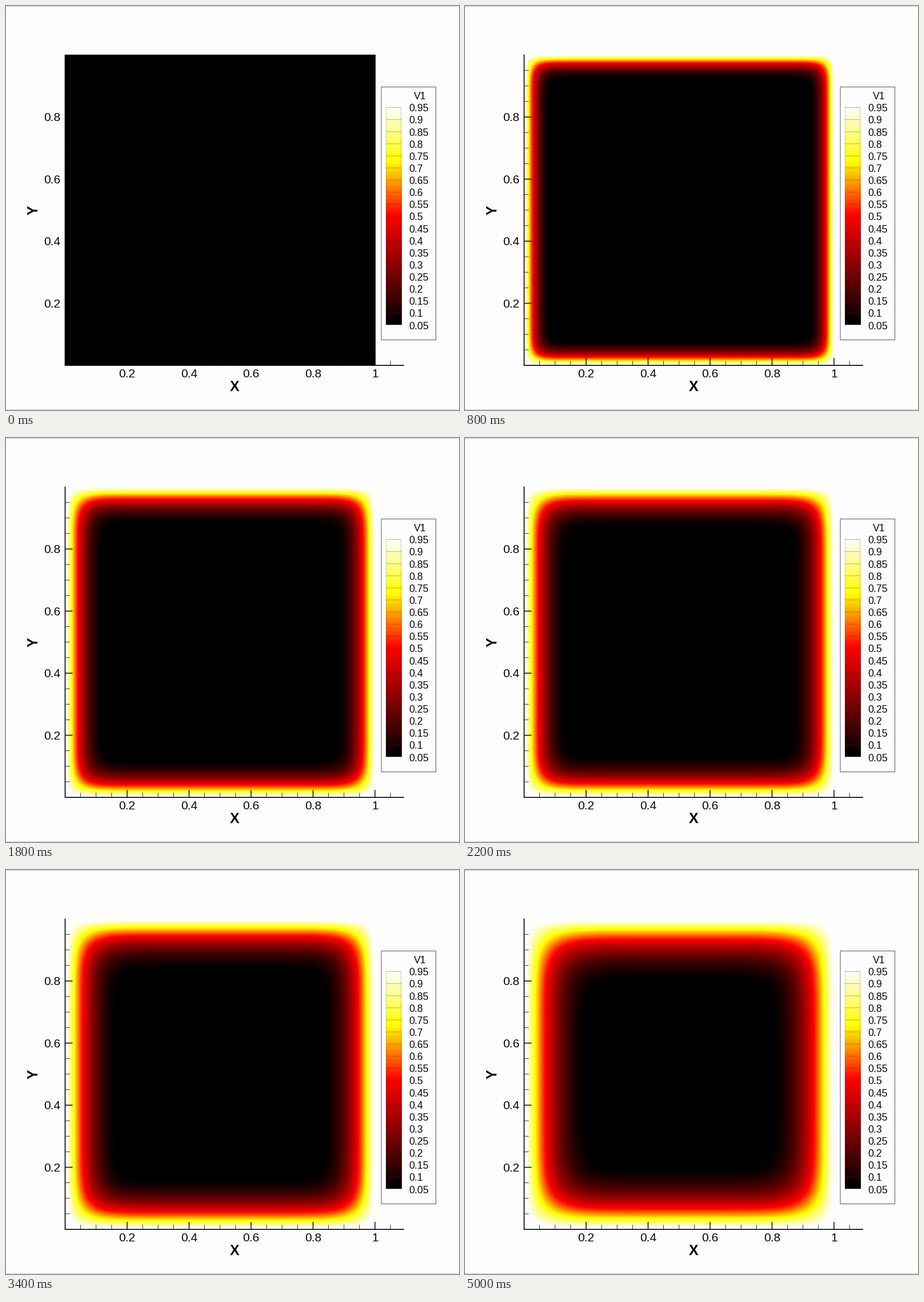
These frames come from a looping animation (793x706 px, 5.2 s). A matplotlib script:

```python
import math

import numpy as np
import matplotlib.pyplot as plt
from matplotlib.animation import FuncAnimation
from matplotlib.colors import LinearSegmentedColormap
from matplotlib.patches import Rectangle

W, H, DPI = 793, 706, 100
FRAMES, INTERVAL = 26, 200
PT = 72 / DPI                      # points per pixel
LEFT, TOP, SIZE = 104, 86, 542     # heat map square
X0, Y0, UNIT = 103.5, 628, 542.5   # axis origin and length of one unit
SPREAD = 15.3                      # diffusion length of step 1
INK = "#0a0a0c"
PAGE = (253 / 255,) * 3

heat = LinearSegmentedColormap.from_list("heat", [
    (0, "black"), (0.05, "black"), (0.5, "red"), (0.725, "yellow"),
    (0.95, PAGE), (1, PAGE)], N=512)

plt.rcParams["font.family"] = "Liberation Sans"
fig = plt.figure(figsize=((W + 0.01) / DPI, (H + 0.01) / DPI), dpi=DPI,
                 facecolor=PAGE)
ax = fig.add_axes([0, 0, 1, 1])


def line(x0, y0, x1, y1, width=1.0, color=INK, **kw):
    ax.plot([x0, x1], [y0, y1], color=color, lw=width * PT,
            solid_capstyle="butt", snap=False, **kw)


def label(x, y, text, size, ha="center", **kw):
    """Text whose capitals are centred vertically on y."""
    ax.text(x, y + 0.345 * size, text, fontsize=size * PT, ha=ha,
            va="baseline", color=INK, **kw)


def profile(step):
    """Share of cold left across one side after the given step."""
    s = SPREAD * math.sqrt(step)
    pos = np.arange(SIZE) + 0.5
    depth = np.minimum(pos, SIZE - pos)
    return np.array([math.erf(d / s) for d in depth])


def field(step):
    if step == 0:
        return np.zeros((SIZE, SIZE))
    cold = profile(step)
    return 1 - np.outer(cold, cold)


def draw_axes():
    line(X0, 85, X0, Y0 + 0.5, 1.7)
    line(X0 - 0.5, Y0, 697, Y0, 1.7)
    for k in range(1, 22):
        major = k % 4 == 0
        length, width = (13, 1.5) if major else (8, 0.8)
        x, y = X0 + UNIT * k / 20, Y0 - UNIT * k / 20
        line(x, Y0, x, Y0 - length, width)
        if k < 20:
            line(X0, y, X0 + length, y, width)
        if major:
            text = f"{k / 20:g}"
            label(x, 642, text, 21)
            if k < 20:
                label(95.3, y, text, 21, "right")
    label(400.3, 664.5, "X", 25, weight="bold")
    ax.text(55.5, 356.5, "Y", fontsize=25 * PT, weight="bold", color=INK,
            rotation=90, rotation_mode="anchor", ha="center", va="baseline")


def draw_legend():
    ax.add_patch(Rectangle((657, 141.5), 95.5, 442, fill=False,
                           ec="#54546e", lw=PT, snap=False))
    label(725, 156.5, "V1", 17.6)
    ramp = np.linspace(0.95, 0.05, 380)[:, None]
    ax.imshow(ramp, cmap=heat, vmin=0, vmax=1, extent=(665, 692, 557, 177),
              aspect="auto", interpolation="nearest")
    for k in range(19):
        y = 177.5 + 21.1 * k
        line(665, y, 692, y, color="#303030", alpha=0.35)
        label(705, 178.2 + 21.13 * k, f"{0.95 - 0.05 * k:.2f}".rstrip("0"),
              17.6, "left")
    for x in (665.5, 691.5):
        line(x, 177, x, 557, color="#303030", alpha=0.2)


image = ax.imshow(field(0), cmap=heat, vmin=0, vmax=1,
                  extent=(LEFT, LEFT + SIZE, TOP + SIZE, TOP),
                  aspect="auto", interpolation="nearest")
draw_axes()
draw_legend()
line(0, 0.5, W, 0.5, color="#c8c8e6")
line(0, H - 0.5, W, H - 0.5, color="#c8c8d2")
ax.set(xlim=(0, W), ylim=(H, 0))
ax.axis("off")


def update(i):
    image.set_data(field(i))
    return [image]


anim = FuncAnimation(fig, update, frames=FRAMES, interval=INTERVAL,
                     init_func=lambda: update(0), repeat=True,
                     repeat_delay=0, blit=False)
plt.show()
```
